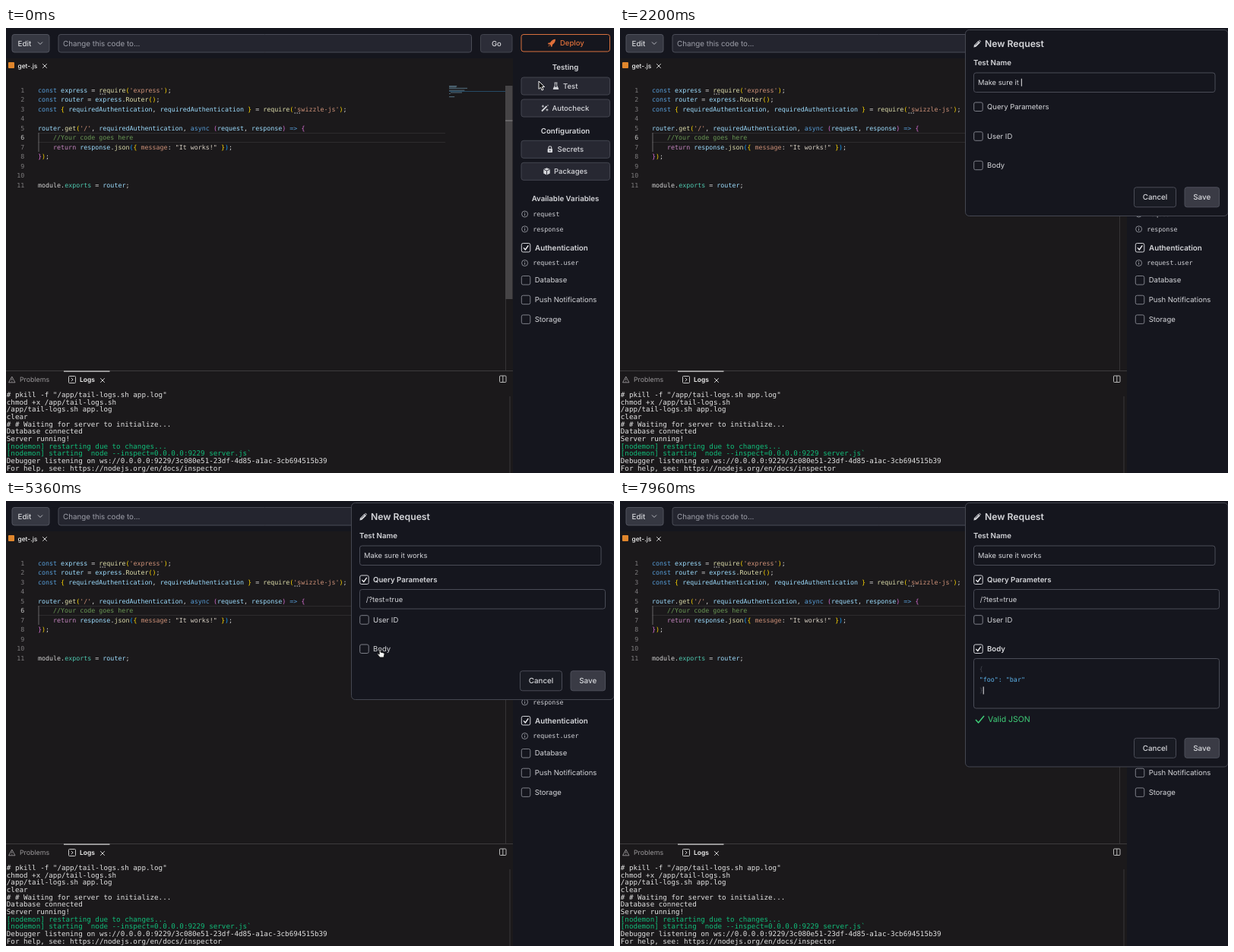
An HTML page with a canvas for the animation above (8000 ms loop, 800 by 586 pixels).

```html
<!DOCTYPE html>
<html lang="en">
<head>
<meta charset="utf-8">
<title>Request tester</title>
<style>
html, body { margin: 0; width: 100%; height: 100%; overflow: hidden; background: #1b191b; }
canvas { display: block; width: 800px; height: 586px; }
</style>
</head>
<body>
<canvas id="stage"></canvas>
<script>
const W = 800, H = 586, LOOP = 8000;
const canvas = document.getElementById('stage');
const dpr = window.devicePixelRatio || 1;
canvas.width = W * dpr;
canvas.height = H * dpr;
const ctx = canvas.getContext('2d');

const SANS = 'Inter, "Liberation Sans", sans-serif';
const MONO = '"DejaVu Sans Mono", monospace';
const PANEL = '#15161e', EDITOR = '#1b191b', LINE = '#4a4c57', TEXT = '#d6d7db', DIM = '#5c5f68';

// Drawing helpers
function box(x, y, w, h, r, fill, stroke) {
  ctx.beginPath();
  ctx.roundRect(x, y, w, h, r);
  if (fill) { ctx.fillStyle = fill; ctx.fill(); }
  if (stroke) { ctx.strokeStyle = stroke; ctx.lineWidth = 1; ctx.stroke(); }
}
function rect(x, y, w, h, fill) {
  ctx.fillStyle = fill;
  ctx.fillRect(x, y, w, h);
}
function path(d, stroke, width = 1, fill) {
  const p = new Path2D(d);
  if (fill) { ctx.fillStyle = fill; ctx.fill(p); }
  if (stroke) { ctx.strokeStyle = stroke; ctx.lineWidth = width; ctx.stroke(p); }
}
function at(x, y, draw) {
  ctx.save();
  ctx.translate(x, y);
  draw();
  ctx.restore();
}
// y is the optical middle of the line
function label(str, x, y, { size = 9.5, weight = 400, color = TEXT, align = 'left' } = {}) {
  ctx.font = `${weight} ${size}px ${SANS}`;
  ctx.fillStyle = color;
  ctx.textAlign = align;
  ctx.fillText(str, x, y + size * 0.36);
  return ctx.measureText(str).width;
}
function mono(str, x, base, color, size = 8.33) {
  ctx.font = `${size}px ${MONO}`;
  ctx.fillStyle = color;
  ctx.textAlign = 'left';
  ctx.fillText(str, x, base);
}
function cross(x, y, r, color, width = 1) {
  path(`M${x - r} ${y - r}L${x + r} ${y + r}M${x + r} ${y - r}L${x - r} ${y + r}`, color, width);
}
function checkbox(x, y, on) {
  box(x, y - 5.5, 11.5, 11.5, 2, null, on ? '#d0d1d6' : '#7d7f88');
  if (on) path(`M${x + 2.7} ${y + 0.4}l2.3 2.6l4 -5.6`, '#f0f0f2', 1.4);
}

// Editor
const INK = {
  k: '#569cd6', v: '#9cdcfe', f: '#dcdcaa', s: '#ce9178', w: '#d4d4d4', g: '#ffd700',
  p: '#da70d6', b: '#179fff', c: '#6a9955', r: '#c586c0', t: '#4ec9b0', q: '#d8d0c4'
};
const CODE = [
  ['k', 'const ', 'v', 'express ', 'w', '= ', 'f', 'require', 'g', '(', 's', "'express'", 'g', ')', 'w', ';'],
  ['k', 'const ', 'v', 'router ', 'w', '= ', 'v', 'express', 'w', '.', 'f', 'Router', 'g', '()', 'w', ';'],
  ['k', 'const ', 'g', '{ ', 'v', 'requiredAuthentication', 'w', ', ', 'v', 'requiredAuthentication ', 'g', '} ',
    'w', '= ', 'f', 'require', 'g', '(', 's', "'swizzle-js'", 'g', ')', 'w', ';'],
  [],
  ['v', 'router', 'w', '.', 'f', 'get', 'g', '(', 's', "'/'", 'w', ', ', 'v', 'requiredAuthentication', 'w', ', ',
    'k', 'async ', 'p', '(', 'v', 'request', 'w', ', ', 'v', 'response', 'p', ') ', 'k', '=> ', 'p', '{'],
  ['c', '    //Your code goes here'],
  ['r', '    return ', 'v', 'response', 'w', '.', 'f', 'json', 'b', '(', 'g', '{ ', 's', 'message', 'w', ': ',
    'q', '"It works!"', 'g', ' }', 'b', ')', 'w', ';'],
  ['p', '}', 'g', ')', 'w', ';'],
  [], [],
  ['w', 'module.', 't', 'exports ', 'w', '= ', 'v', 'router', 'w', ';']
];
const LOGS = `# pkill -f "/app/tail-logs.sh app.log"
chmod +x /app/tail-logs.sh
/app/tail-logs.sh app.log
clear
# # Waiting for server to initialize...
Database connected
Server running!
[nodemon] restarting due to changes...
[nodemon] starting \`node --inspect=0.0.0.0:9229 server.js\`
Debugger listening on ws://0.0.0.0:9229/3c080e51-23df-4d85-a1ac-3cb694515b39
For help, see: https://nodejs.org/en/docs/inspector`.split('\n');

function dots(x, y) {
  for (let i = 0; i < 3; i++) rect(x + i * 3, y, 1.4, 1.4, '#a8a8a8');
}

function drawEditor(t) {
  rect(0, 0, W, H, EDITOR);
  rect(0, 0, 667, 40, PANEL);
  box(8, 8.5, 49, 23.5, 3, '#363842', '#50525d');
  label('Edit', 15.5, 20.3, { weight: 500, size: 9.8 });
  path('M42 18.5l3 3l3 -3', '#b8b9c0', 1);
  box(69, 8.5, 543.5, 23.5, 3, '#24252f', LINE);
  label('Change this code to...', 75, 20.3, { size: 9.8, color: '#9c9ea8' });
  box(624.5, 8.5, 41.5, 23.5, 3, '#2c2d38', '#43454f');
  label('Go', 645.3, 20.3, { weight: 500, align: 'center' });

  box(3, 45, 8, 8, 1, '#e0862c');
  label('get-.js', 15.5, 49.5, { size: 8.4, weight: 500, color: '#f2f2f2' });
  cross(51, 50, 2.8, '#d0d0d0');

  rect(42, 138, 536, 1, '#2d2b2d');
  rect(42, 150, 536, 1, '#2d2b2d');
  rect(42.5, 138, 1, 25, '#696769');
  CODE.forEach((line, i) => {
    const base = 85 + i * 12.48;
    const num = String(i + 1);
    mono(num, 24.3 - num.length * 5.02, base, i === 5 ? '#c6c6c6' : '#7c7a7c');
    let col = 0;
    for (let j = 0; j < line.length; j += 2) {
      mono(line[j + 1], 42 + col * 5.02, base, INK[line[j]]);
      col += line[j + 1].length;
    }
  });
  dots(123.5, 86.3);
  dots(379.5, 111.3);

  // Minimap and scrollbar
  ctx.globalAlpha = 0.5;
  [[0, 17], [0, 16], [0, 40], [0, 0], [0, 34], [2, 12], [2, 25], [0, 3], [0, 0], [0, 0], [0, 12]].forEach(([x, w], i) => {
    rect(583 + x, 76 + i * 1.42, w * 0.6, 0.9, i === 5 ? INK.c : INK.v);
  });
  ctx.globalAlpha = 1;
  rect(583, 83, 74, 1, '#264b66');
  rect(657, 76, 1, 375, '#363436');
  const fade = 1 - Math.min(1, Math.max(0, (t - 80) / 720));
  if (fade) {
    ctx.globalAlpha = fade;
    rect(657, 76, 9.5, 281, '#464446');
    ctx.globalAlpha = 1;
  }
  rect(657, 121.5, 9.5, 1, '#8a888a');

  // Log panel
  rect(0, 451, 667, 1, '#3d3b3d');
  rect(76, 451.5, 60.5, 1.2, '#dcdcdc');
  path('M7.8 459L12 466.8H3.6ZM7.8 461.6v2.5M7.8 465v0.8', '#9a989a', 0.9);
  label('Problems', 18, 463, { size: 8.8, color: '#9a989a' });
  box(82.5, 458.5, 9, 9, 1, null, '#c8c8c8');
  path('M85.7 460.8l2.4 2.2l-2.4 2.2', '#c8c8c8');
  label('Logs', 97, 463, { size: 8.5, weight: 600, color: '#f0f0f0' });
  cross(127, 464, 2.8, '#d0d0d0');
  box(649.5, 458, 8.5, 8.5, 1, null, '#b8b8b8');
  path('M653.8 458v8.5', '#b8b8b8');
  rect(662.5, 485, 1, 101, '#3a383a');
  LOGS.forEach((s, i) => mono(s, 0.8, 485.8 + i * 9.71, s[0] === '[' ? '#10bc79' : '#e2e2e2', 9.22));
}

// Sidebar
function rocket() {
  path('M5 -5C2 -5 -0.5 -3 -2 -0.6L-4.6 0L-5 1.4L-2.6 1.6L-1.2 3L-1 5L0.5 4.6L1 2.2C3.6 0.6 5 -2 5 -5Z', null, 1, '#e0703a');
  path('M-3 2.4L-5 5L-2.2 3.4Z', null, 1, '#e0703a');
  path('M1.9 -1.9h0.1', PANEL, 1.8);
}
function flask() {
  path('M-2 -4.4H2M-1.2 -4V-0.8L-3.4 3.8H3.4L1.2 -0.8V-4', TEXT, 1);
  path('M-2 1L-3.4 4H3.4L2 1Z', null, 1, TEXT);
}
function wand() {
  path('M-4 4L2.6 -2.6', TEXT, 1.9);
  path('M-2.6 -4v3M-4.1 -2.5h3M3 0.8v3M1.5 2.3h3M4 -4.4v1.6', TEXT, 0.9);
}
function lock() {
  box(-3.2, -0.8, 6.4, 5, 1, TEXT);
  path('M-1.9 -0.5V-2.2A1.9 1.9 0 0 1 1.9 -2.2V-0.5', TEXT, 1.1);
  rect(-0.5, 0.8, 1, 1.8, '#272832');
}
function cube() {
  path('M0 -4.6L4.2 -2.8V2.6L0 4.6L-4.2 2.6V-2.8Z', null, 1, TEXT);
  path('M-4 -2.6L0 -0.8L4 -2.6M0 -0.8V4.6', '#272832', 0.9);
}
function sideButton(str, y, textX, iconX, icon) {
  box(678, y - 11.5, 116.5, 23, 3, '#272832', '#43454f');
  at(iconX, y, icon);
  label(str, textX, y, { weight: 500 });
}
function info(str, y) {
  ctx.beginPath();
  ctx.arc(682.6, y, 4, 0, 7);
  ctx.strokeStyle = '#a4a6ae';
  ctx.lineWidth = 0.8;
  ctx.stroke();
  path(`M682.6 ${y - 0.6}v2.8M682.6 ${y - 2.4}v1`, '#a4a6ae', 0.9);
  mono(str, 693.3, y + 2.8, '#d0d1d6');
}
function drawSidebar() {
  rect(667, 0, 133, H, PANEL);
  box(678, 8.5, 116.5, 22.5, 3, PANEL, '#d8703e');
  at(718, 19.8, rocket);
  label('Deploy', 729, 19.8, { weight: 500, color: '#e0703a' });
  const head = { weight: 600, size: 9.7, align: 'center' };
  label('Testing', 736, 52, head);
  sideButton('Test', 76.5, 733, 723.5, flask);
  sideButton('Autocheck', 105.5, 718.5, 709, wand);
  label('Configuration', 736, 135.3, head);
  sideButton('Secrets', 159.8, 725.5, 715.8, lock);
  sideButton('Packages', 188.8, 721, 711.5, cube);
  label('Available Variables', 736, 224.3, head);
  info('request', 245);
  info('response', 264.8);
  checkbox(678.3, 289, true);
  label('Authentication', 696, 289, { weight: 600, size: 9.8 });
  info('request.user', 309.5);
  ['Database', 'Push Notifications', 'Storage'].forEach((s, i) => {
    checkbox(678.3, 332 + i * 25.7, false);
    label(s, 695.7, 332 + i * 25.7);
  });
}

// Dialog
const NAME = 'Make sure it works', QUERY = '?test=true', BODY = '{\n"foo": "bar"\n}';
const OPEN = 480, QUERY_ON = 2620, BODY_ON = 5480;

function typed(str, t, start, step) {
  return str.slice(0, Math.max(0, Math.floor((t - start) / step)));
}
function caret(x, y, h = 10) {
  rect(x, y - h / 2, 1, h, '#e8e8ea');
}
function field(x, y, str, hint, focused) {
  const size = 9.35;
  const w = str ? label(str, x, y, { size }) : 0;
  if (!str) label(hint, x, y, { size: 9.5, color: DIM });
  if (focused) caret(x + w + 0.3, y);
}
function option(str, y, on) {
  checkbox(465.7, y, on);
  label(str, 483, y, on ? { weight: 600, size: 9.65 } : {});
}
function drawBody(t) {
  box(465.5, 207.5, 323, 65.5, 3, PANEL, LINE);
  const text = typed(BODY, t, 6300, 100);
  const lines = text.split('\n');
  lines.forEach((line, i) => {
    const base = 224 + i * 14.1;
    let col = 0;
    for (const part of line.match(/"[^"]*":?|"[^"]*$|[^"]+/g) || []) {
      const color = /[{}]/.test(part) ? '#41444d' : /^".*"/.test(part) ? '#5db4ec' : TEXT;
      mono(part, 472.7 + col * 5.02, base, color);
      col += part.length;
    }
  });
  if (t > 5900) caret(472.7 + lines[lines.length - 1].length * 5.02, 221.3 + (lines.length - 1) * 14.1);
  if (text === BODY) {
    path('M468 288l3.6 4l7.4 -9', '#3fce78', 1.5);
    label('Valid JSON', 484, 287.7, { size: 10.5, color: '#3fce78' });
  } else {
    cross(473.6, 287.7, 4, '#e0625c', 1.4);
    label('Invalid JSON', 484, 287.7, { size: 10.5, color: '#e0625c' });
  }
}
function drawDialog(t) {
  if (t < OPEN) return;
  const query = t >= QUERY_ON, body = t >= BODY_ON;
  const bottom = body ? 350 : query ? 261.5 : 247.5;
  ctx.save();
  ctx.globalAlpha = Math.min(1, (t - OPEN) / 200);
  box(454.5, 2.5, 345.5, bottom - 2.5, 5, PANEL, '#454751');
  at(470, 20.8, () => {
    path('M-4.6 4.6L-4 1.6L1.6 -4L4 -1.6L-1.6 4Z', null, 1, TEXT);
    path('M2.3 -4.6L3 -5L5 -3L4.6 -2.3Z', null, 1, TEXT);
    path('M-2.6 1.8L1.6 -2.4', PANEL, 0.7);
  });
  label('New Request', 480, 20.8, { size: 12.2, weight: 600 });
  label('Test Name', 465, 46, { size: 9.7, weight: 600 });
  box(465.5, 59, 317.5, 25.5, 3, PANEL, LINE);
  field(471, 71.7, typed(NAME, t, 1480, 52), 'Test Name', t > 1420 && t < QUERY_ON);
  option('Query Parameters', 103.5, query);
  if (query) {
    box(465.5, 116.5, 323, 25.5, 3, PANEL, LINE);
    label('/', 473.8, 129.2, { size: 9.35 });
    field(477.2, 129.2, typed(QUERY, t, 3080, 105), '?key=value&key2=value2', t > 2780 && t < 5000);
  }
  option('User ID', query ? 156.2 : 142.3, false);
  option('Body', query ? 194.5 : 180.7, body);
  if (body) drawBody(t);
  const y = bottom - 24.7;
  box(676.5, y - 13, 55, 26, 3, '#191b23', LINE);
  label('Cancel', 704, y, { weight: 500, size: 9.8, align: 'center' });
  box(743, y - 13, 45.5, 26, 3, '#3a3b45', '#4d4f5a');
  label('Save', 765.7, y, { weight: 500, size: 9.8, align: 'center' });
  ctx.restore();
}

// Pointer: time, x, y; hidden while typing
const TRACK = [
  [0, 701, 70], [320, 738, 75], [700, 738, 75], [1250, 645, 72], [2440, 645, 72], [2580, 498, 104],
  [2640, 498, 104], [2800, 547, 126], [4450, 547, 126], [5200, 492, 195], [5520, 492, 195], [5880, 548, 238]
];
const HIDDEN = [[1480, 2440], [3060, 4400], [6280, LOOP]];
const SHAPES = [
  [0, 'arrow'], [160, 'hand'], [500, 'arrow'], [1120, 'beam'], [2520, 'hand'],
  [2700, 'beam'], [4800, 'hand'], [5640, 'beam']
];
const DRAW = {
  arrow: () => path('M0 0V10.4L2.5 8.2L4.1 12L6 11.2L4.4 7.5H7.6Z', '#f4f4f4', 1, '#0a0a0a'),
  beam: () => {
    const d = 'M-2.6 -5.6Q0 -5.6 0 -4V4Q0 5.6 -2.6 5.6M2.6 -5.6Q0 -5.6 0 -4V4Q0 5.6 2.6 5.6M-1.4 1.6H1.4';
    path(d, '#101010', 2.6);
    path(d, '#f0f0f0', 1.2);
  },
  hand: () => path('M-0.9 0.8A1 1 0 0 1 1 0.8V4L5 5Q6.2 5.4 6 6.8L5 11H0L-3.2 7Q-3.6 5.6 -2.2 5.8L-0.9 7Z', '#101010', 0.9, '#f4f4f4')
};
function drawPointer(t) {
  if (HIDDEN.some(([a, b]) => t >= a && t < b)) return;
  const i = TRACK.findLastIndex(k => k[0] <= t);
  const [t0, x0, y0] = TRACK[i];
  const [t1, x1, y1] = TRACK[i + 1] || [LOOP, x0, y0];
  const u = (t - t0) / (t1 - t0);
  const e = u * u * (3 - 2 * u);
  const shape = SHAPES.findLast(s => s[0] <= t)[1];
  at(x0 + (x1 - x0) * e, y0 + (y1 - y0) * e, DRAW[shape]);
}

function render(t) {
  ctx.setTransform(dpr, 0, 0, dpr, 0, 0);
  ctx.textBaseline = 'alphabetic';
  ctx.textRendering = 'geometricPrecision';
  ctx.lineJoin = 'round';
  drawEditor(t);
  drawSidebar();
  drawDialog(t);
  drawPointer(t);
}

const start = performance.now();
function frame() {
  render((performance.now() - start) % LOOP);
  requestAnimationFrame(frame);
}
frame();
</script>
</body>
</html>
```
